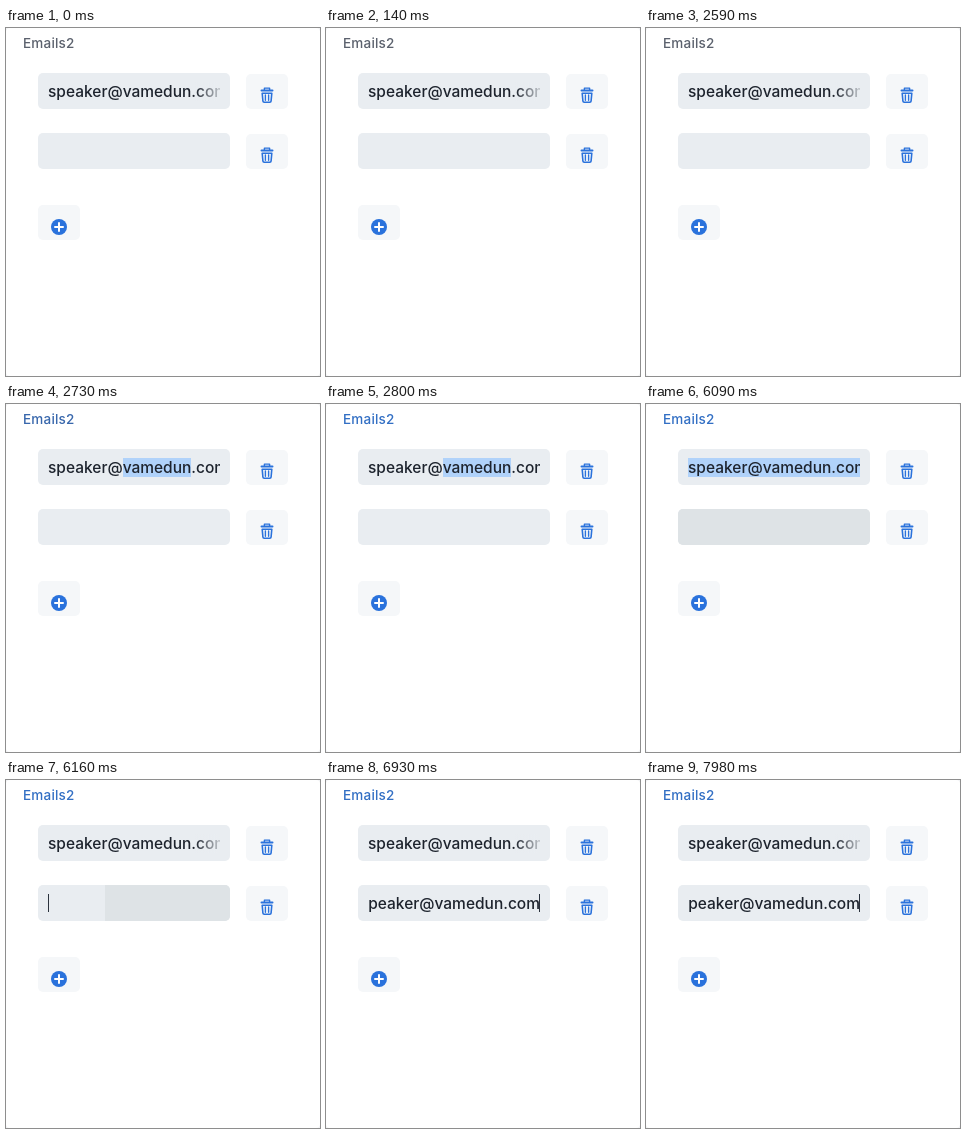
Recreate the animation shown at these times as an HTML page. Size 314x348 px, loop 8000 ms.

```html
<!DOCTYPE html>
<html lang="en">
<head>
<meta charset="utf-8">
<title>Email list form</title>
<style>
  html, body {
    margin: 0;
    width: 100%;
    height: 100%;
    overflow: hidden;
    background: #f1f2f4;
  }
  .card {
    position: relative;
    width: 314px;
    height: 348px;
    border-radius: 4px;
    overflow: hidden;
    background: #fff;
    font-family: Inter, sans-serif;
    font-weight: 500;
    white-space: nowrap;
  }
  .card div, .card svg { position: absolute; }

  /* Every state change is a hard step on one shared 8 s clock. */
  .label, .fade, .word, .rest, .hover, .caret, .pasted {
    animation: 8s step-end infinite;
  }

  .label {
    left: 17px;
    top: 6px;
    font-size: 13.5px;
    line-height: 18px;
    letter-spacing: .015em;
    animation-name: focus-label;
  }

  .field {
    left: 32px;
    width: 192px;
    height: 36px;
    border-radius: 5px;
    overflow: hidden;
    background: #e9edf1;
  }
  .text {
    left: 10px;
    top: 9px;
    width: 172px;
    height: 19px;
    overflow: hidden;
    font-size: 15.5px;
    line-height: 19px;
    color: #1d232d;
  }
  .rest { animation-name: select-all; }
  .word { animation-name: select-word; }
  .fade {
    right: 0;
    top: 0;
    width: 25px;
    height: 19px;
    background: linear-gradient(90deg, #e9edf100, #e9edf1d0);
    animation-name: blur-fade;
  }
  .hover {
    inset: 0;
    animation-name: hover;
  }
  .pasted {
    right: 0;
    animation-name: paste;
  }
  .caret {
    left: 10px;
    top: 9px;
    width: 1px;
    height: 18px;
    background: #2b323d;
    animation-name: caret;
  }

  .button {
    width: 42px;
    height: 35px;
    border-radius: 5px;
    background: #f5f7f9;
  }
  .button svg {
    left: 13px;
    top: 13px;
    width: 16px;
    height: 16px;
  }

  @keyframes focus-label {
    0% { color: #5b616d; }
    33.25% { color: #4a658e; }
    34.125% { color: #3867ac; }
    35% { color: #326fc4; }
  }
  @keyframes select-word {
    0%, 77% { background: transparent; }
    34.125% { background: #b0d2fa; }
  }
  @keyframes select-all {
    0%, 77% { background: transparent; }
    35.875% { background: #b0d2fa; }
  }
  @keyframes blur-fade {
    0%, 77% { opacity: 1; }
    33.25% { opacity: 0; }
  }
  @keyframes hover {
    0%, 79.625% { background: transparent; }
    49% { background: #e5e9ed; }
    49.875% { background: #e0e4e9; clip-path: inset(0); }
    76.125% { background: #dee3e6; clip-path: inset(0); }
    77% { background: #dee3e6; clip-path: inset(0 0 0 67px); }
    78.75% { background: #e5e9ed; clip-path: inset(0 0 0 67px); }
  }
  @keyframes paste {
    0% { visibility: hidden; }
    86.625%, 100% { visibility: visible; }
  }
  @keyframes caret {
    0%, 84% { opacity: 0; left: 10px; }
    77% { opacity: 1; left: 10px; }
    86.625% { opacity: 1; left: 181px; }
    92.75% { opacity: 0; left: 181px; }
    99.75%, 100% { opacity: 1; left: 181px; }
  }
</style>
</head>
<body>
<svg width="0" height="0" style="position:absolute">
  <symbol id="trash" viewBox="0 0 16 16">
    <g fill="none" stroke="#2a72dc" stroke-linejoin="round" stroke-linecap="round">
      <path d="M2.5 3.6H13.5" stroke-width="2"/>
      <path d="M5.4 3V1.1H10.6V3" stroke-width="1.4"/>
      <path d="M3.2 6.2L3.9 14Q4 15.2 5.2 15.2H10.8Q12 15.2 12.1 14L12.8 6.2Z" stroke-width="1.6"/>
      <path d="M6.4 8V13.2M9.6 8V13.2" stroke-width="1.4"/>
    </g>
  </symbol>
</svg>
<div class="card">
  <div class="label">Emails2</div>

  <div class="field" style="top:45px">
    <div class="text"><span class="rest">speaker@</span><span class="word">vamedun</span><span class="rest">.com</span><div class="fade"></div></div>
  </div>
  <div class="button" style="left:240px;top:46px"><svg><use href="#trash"/></svg></div>

  <div class="field" style="top:105px">
    <div class="hover"></div>
    <div class="text"><div class="pasted">speaker@vamedun.com</div></div>
    <div class="caret"></div>
  </div>
  <div class="button" style="left:240px;top:106px"><svg><use href="#trash"/></svg></div>

  <div class="button" style="left:32px;top:177px">
    <svg viewBox="0 0 16 16" style="top:14px">
      <circle cx="8" cy="8" r="8" fill="#2a72dc"/>
      <path d="M8 4V12M4 8H12" stroke="#fff" stroke-width="2" stroke-linecap="round"/>
    </svg>
  </div>
</div>
</body>
</html>
```
